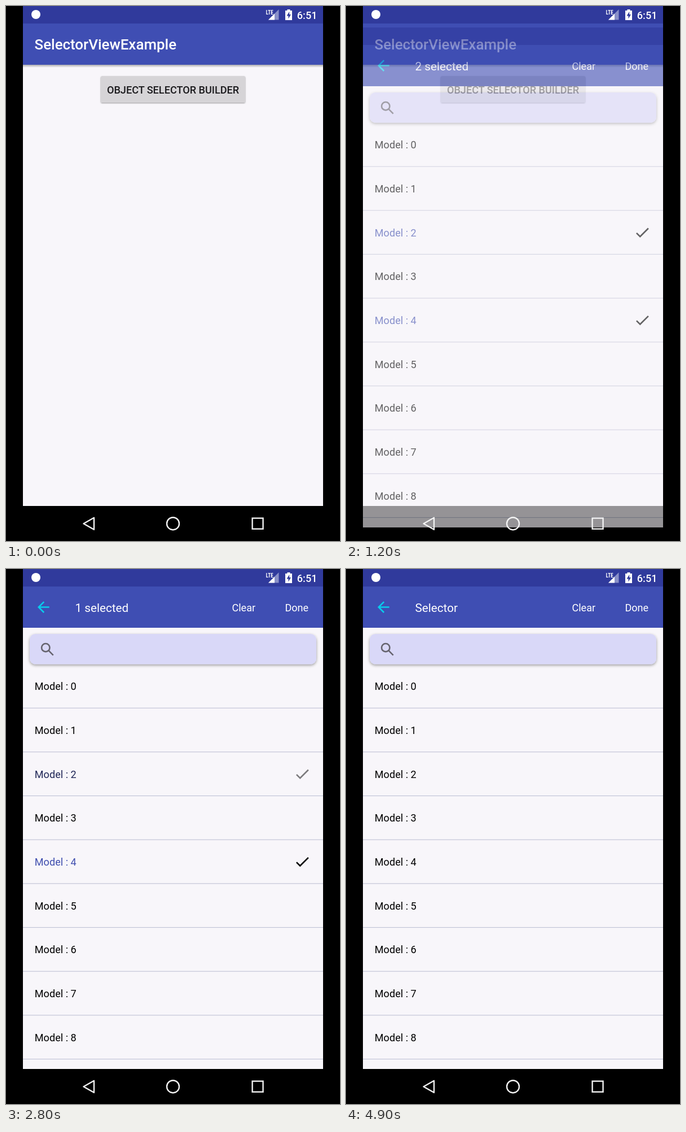
An HTML page for the animation above (5000 ms loop, 592 by 947 pixels).

```html
<!DOCTYPE html>
<html lang="en">
<head>
<meta charset="utf-8">
<title>Selector view</title>
<style>
html, body { margin: 0; width: 100%; height: 100%; overflow: hidden; background: #000; }
svg { display: block; width: 592px; height: 947px; font: 18.13px Roboto, sans-serif; }
.medium { font-weight: 500; }
.bar { fill: #3f4eb3; }
.status { fill: #303a9c; }
.page { fill: #f8f6fa; }
.light { fill: #fff; }
</style>
</head>
<body>
<svg viewBox="0 0 592 947">
  <defs>
    <linearGradient id="fade" x2="0" y2="1">
      <stop stop-color="#000" stop-opacity=".3"/>
      <stop offset="1" stop-color="#000" stop-opacity="0"/>
    </linearGradient>
    <filter id="soft" x="-10%" y="-30%" width="120%" height="170%">
      <feDropShadow dx="0" dy="2" stdDeviation="2.6" flood-opacity=".38"/>
    </filter>
    <filter id="thin" x="-5%" y="-20%" width="110%" height="150%">
      <feDropShadow dx="0" dy="1" stdDeviation="1.1" flood-opacity=".4"/>
    </filter>
    <path id="check" d="M9 16.17 4.83 12l-1.42 1.41L9 19 21 7l-1.41-1.41z"/>
  </defs>

  <rect width="592" height="947"/>

  <g id="home">
    <rect class="page" x="30" width="532" height="885"/>
    <rect class="status" x="30" width="532" height="31"/>
    <rect class="bar" x="30" y="31" width="532" height="73"/>
    <rect x="30" y="104" width="532" height="5" fill="url(#fade)"/>
    <text class="medium light" x="50.5" y="77.3" font-size="25.9">SelectorViewExample</text>
    <rect x="168" y="124" width="256" height="47" rx="2.5" fill="#d6d4d7" filter="url(#thin)"/>
    <text class="medium" x="296" y="154.5" text-anchor="middle" fill="#1b1a1d">OBJECT SELECTOR BUILDER</text>
  </g>

  <g id="picker">
    <rect class="page" x="30" width="532" height="885"/>
    <rect class="status" x="30" width="532" height="31"/>
    <rect class="bar" x="30" y="31" width="532" height="73"/>
    <circle id="ripple" class="light" cx="421.5" cy="68" r="23"/>
    <path transform="translate(50.8 52) scale(1.295)" fill="#08ccec"
      d="M20 11H7.83l5.59-5.59L12 4l-8 8 8 8 1.41-1.41L7.83 13H20z"/>
    <text id="title" class="light" x="122.5" y="75.5" font-size="20.7"></text>
    <text class="light" x="400.4" y="74.6">Clear</text>
    <text class="light" x="494.4" y="74.6">Done</text>
    <rect x="42" y="115" width="508" height="53.5" rx="10" fill="#d9d8f8" filter="url(#soft)"/>
    <g fill="none" stroke="#66646f" stroke-width="2.6">
      <circle cx="70.3" cy="139.2" r="7.2"/>
      <path d="M75.3 144.2l8.4 8.4"/>
    </g>
    <g id="rows"></g>
  </g>

  <g>
    <circle class="light" cx="53" cy="15" r="8"/>
    <path d="M461.8 7v7.4h3M464.5 7.6h4.4M466.7 7v8M473.4 7.6h-3v6.8h3M470.4 11h2.6" fill="none" stroke="#fff" stroke-width="1.3"/>
    <path d="M465 24.5 483.5 6v18.5z" fill="#8990c8"/>
    <path class="light" d="M465 24.5 476 13.5v11z"/>
    <path class="light" d="M495 8h3.5V6h5v2h3.5v17h-12z"/>
    <path class="status" d="M502.2 10l-4.7 7.4h3v5.1l4.5-7.4h-2.8z"/>
    <text class="medium light" x="515.8" y="22.7">6:51</text>
  </g>
  <g fill="none" stroke="#f2f2f2" stroke-width="2.4">
    <path d="M137.5 916.2 156 905.8v21z" stroke-linejoin="round"/>
    <circle cx="296" cy="916.2" r="11"/>
    <rect x="436.6" y="906.6" width="19" height="19"/>
  </g>
</svg>
<script>
const LOOP = 5000, STEP = 100, PITCH = 77.67;
const OPEN = 1200, DROP_TWO = 2800, CLEAR = 4500;
const get = id => document.getElementById(id);
const clamp = v => Math.max(0, Math.min(1, v));
const picker = get("picker"), title = get("title"), ripple = get("ripple");

get("rows").innerHTML = Array.from({ length: 9 }, (_, i) => `
  <g transform="translate(0 ${i * PITCH})">
    <text x="50.8" y="214.4">Model : ${i}</text>
    <rect x="30" y="245.6" width="532" height="1.1" fill="#bfc1d5"/>
    <use href="#check" transform="translate(509.6 192) scale(1.295)"/>
  </g>`).join("");
const rows = [...get("rows").children];

function select(index, amount) {
  const row = rows[index];
  const [r, g, b] = [63, 78, 174].map(c => Math.round(c * amount));
  row.querySelector("text").setAttribute("fill", `rgb(${r},${g},${b})`);
  row.querySelector("use").setAttribute("opacity", amount);
}

function draw(t) {
  const entering = t < OPEN + STEP;
  const shift = entering ? 38 : t < 1500 ? 4.3 : 0;
  picker.style.display = t < OPEN ? "none" : "";
  picker.setAttribute("opacity", entering ? 0.6 : 1);
  picker.setAttribute("transform", `translate(0 ${shift})`);

  title.textContent = t < DROP_TWO ? "2 selected" : t < CLEAR ? "1 selected" : "Selector";
  const fadeOut = start => 1 - clamp((t - start + STEP) / 200);
  select(2, fadeOut(DROP_TWO));
  select(4, fadeOut(CLEAR));
  ripple.setAttribute("opacity", t < CLEAR ? 0 : 0.12 * clamp(1 - (t - CLEAR) / 400));
}

rows.forEach((_, i) => select(i, 0));
const start = performance.now();
function tick() {
  const t = (performance.now() - start) % LOOP;
  draw(Math.floor(t / STEP) * STEP);
  requestAnimationFrame(tick);
}
tick();
</script>
</body>
</html>
```
